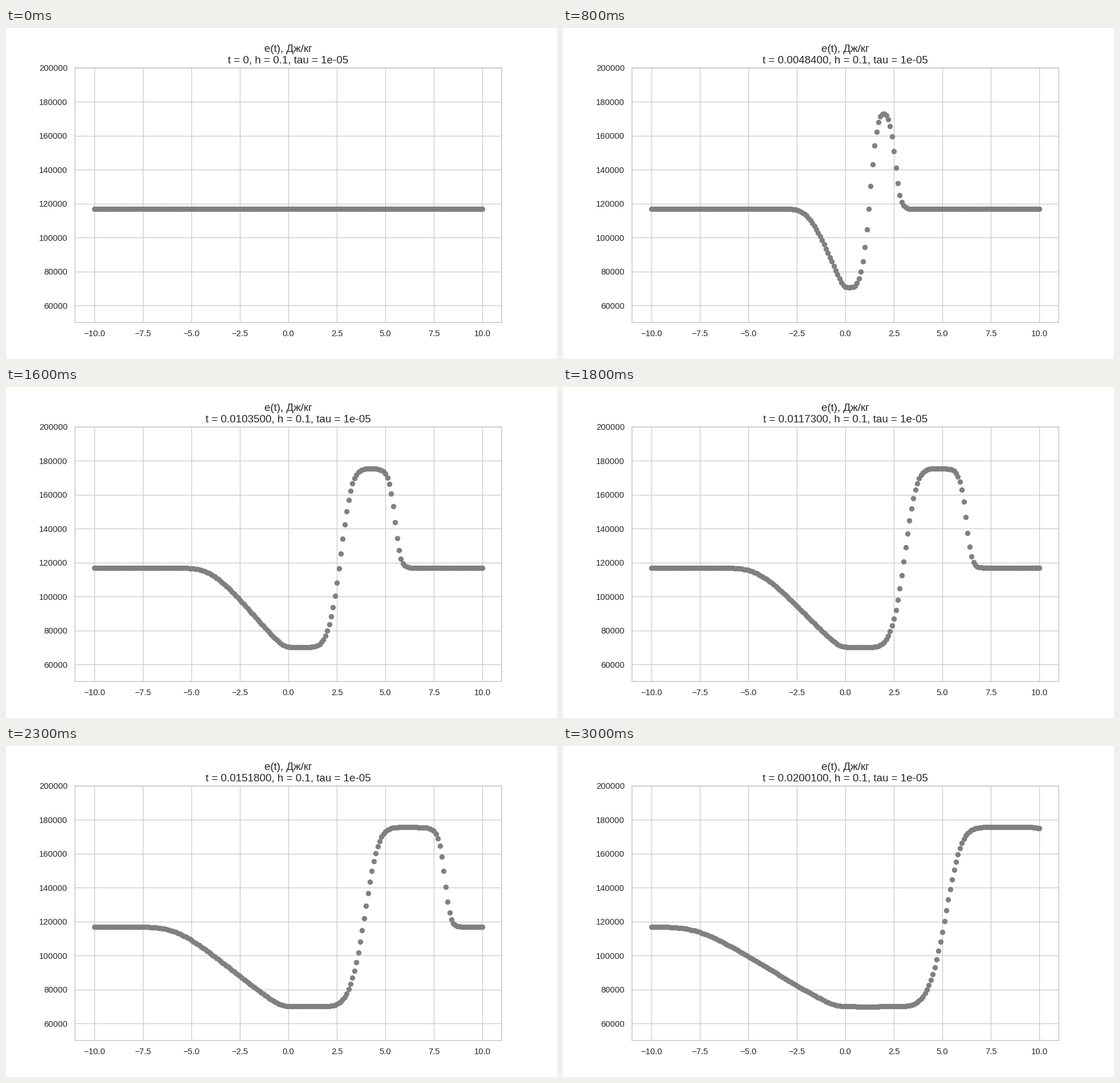
A matplotlib script that plays this animation: 966x580 px, repeating every 3100 ms.

```python
import numpy as np
import matplotlib.pyplot as plt
from matplotlib.animation import FuncAnimation

DPI = 64
PT = 96.6 / DPI          # one design point in figure points
FRAMES, INTERVAL = 31, 100

GAMMA = 5 / 3
ATM = 101325.0
H, TAU, T_END = 0.1, 1e-5, 0.02
x = np.linspace(-10, 10, 201)

plt.rcParams["font.family"] = "Liberation Sans"
plt.rcParams["text.color"] = "0.15"


def start_state():
    """Gas at rest, ten times denser and at ten times the pressure on the left."""
    ratio = np.where(x < 0, 10.0, 1.0)
    return np.array([1.3 * ratio, 0 * x, ATM * ratio / (GAMMA - 1)])


def advance(w):
    """One upwind step in characteristic variables for (rho, rho*u, rho*e)."""
    mid = w[:, 1:-1]
    u, e = mid[1] / mid[0], mid[2] / mid[0]
    c = np.sqrt(GAMMA * (GAMMA - 1) * e)
    diff = np.diff(w, axis=1)
    back, ahead = diff[:, :-1], diff[:, 1:]
    change = np.zeros_like(mid)

    for sign in (-1, 0, 1):
        speed = u + sign * c
        d = np.where(speed > 0, back, ahead)
        if sign:
            amp = sign * c * (d[1] - u * d[0]) + (GAMMA - 1) * d[2]
            amp = amp / (2 * c**2)
            energy = c**2 / (GAMMA - 1)
        else:
            amp = d[0] - (GAMMA - 1) * d[2] / c**2
            energy = 0 * c
        change += speed * amp * np.array([np.ones_like(c), speed, energy])

    new = w.copy()
    new[:, 1:-1] -= TAU / H * change
    new[:, 0], new[:, -1] = new[:, 1], new[:, -2]
    return new


def solve():
    """Energy profiles and their step numbers, one pair per frame."""
    marks = np.rint(np.linspace(0, T_END / TAU, FRAMES - 1)).astype(int) + 1
    steps = [0, *marks]
    w = start_state()
    profiles = [w[2] / w[0]]
    for before, after in zip(steps, steps[1:]):
        for _ in range(after - before):
            w = advance(w)
        profiles.append(w[2] / w[0])
    return steps, profiles


steps, profiles = solve()

fig = plt.figure(figsize=(966 / DPI, 580 / DPI), dpi=DPI, facecolor="white")
ax = fig.add_axes([0.125, 0.11, 0.775, 0.77])
ax.set_xlim(-11, 11)
ax.set_ylim(50000, 200000)
ax.set_xticks(np.arange(-10, 10.1, 2.5))
ax.set_axisbelow(True)
ax.grid(color="0.8", linewidth=PT)
ax.tick_params(left=False, bottom=False, length=6 * PT, pad=3.5 * PT,
               labelsize=11 * PT, labelcolor="0.15")
for spine in ax.spines.values():
    spine.set(color="0.8", linewidth=1.25 * PT)

dots, = ax.plot(x, profiles[0], "o", color="gray",
                markersize=6 * PT, markeredgewidth=PT)
title = ax.set_title("", fontsize=14 * PT, pad=6 * PT)


def update(i):
    time = f"{steps[i] * TAU:.7f}" if i else "0"
    title.set_text(f"e(t), Дж/кг\nt = {time}, h = {H}, tau = {TAU}")
    dots.set_ydata(profiles[i])
    return dots, title


anim = FuncAnimation(fig, update, frames=FRAMES, interval=INTERVAL,
                     init_func=lambda: update(0), repeat=True, repeat_delay=0)
plt.show()
```
